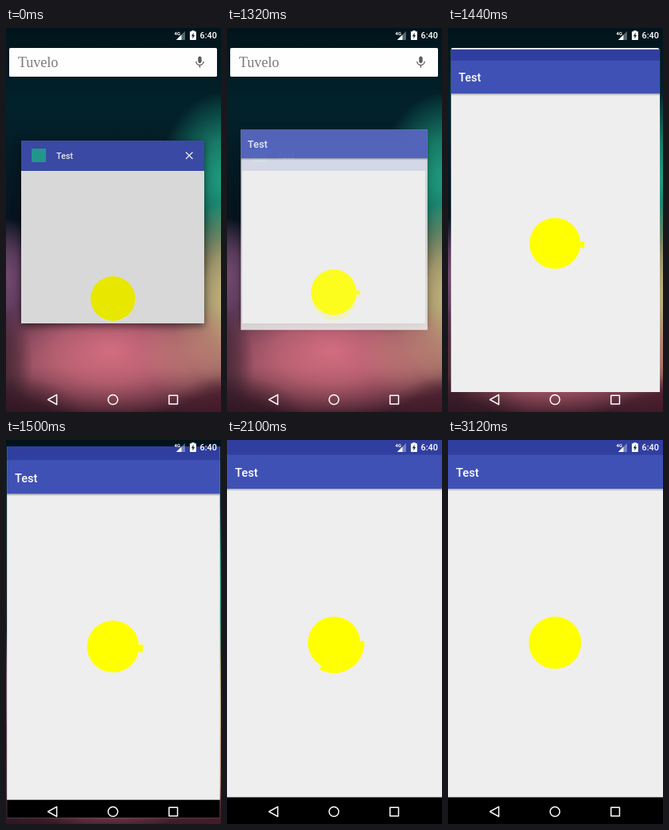
These frames come from a looping animation (269 by 481 pixels, 4110 ms). An HTML page with a canvas:

```html
<!DOCTYPE html>
<html lang="en">
<head>
<meta charset="utf-8">
<title>Opening an app from recents</title>
<style>
html, body { margin: 0; width: 100%; height: 100%; overflow: hidden; background: #000; }
canvas { display: block; }
</style>
</head>
<body>
<canvas id="stage" width="269" height="481"></canvas>
<script>
const W = 269, H = 481, LOOP = 4110, STEP = 30;
const ctx = document.getElementById('stage').getContext('2d');
const TAU = Math.PI * 2;
const SANS = 'Roboto, "Noto Sans", sans-serif';

const lerp = (a, b, k) => a + (b - a) * k;
const ramp = (t, a, b) => Math.min(1, Math.max(0, (t - a) / (b - a)));

// Cubic bezier (.4, 0, .2, 1), solved for x by bisection
function fastOutSlowIn(x) {
  let lo = 0, hi = 1;
  for (let i = 0; i < 24; i++) {
    const s = (lo + hi) / 2, r = 1 - s;
    if (1.2 * r * r * s + 0.6 * r * s * s + s * s * s < x) lo = s; else hi = s;
  }
  return lo * lo * (3 - 2 * lo);
}

function rect(c, color, x, y, w, h) {
  c.fillStyle = color;
  c.fillRect(x, y, w, h);
}

function disc(color, x, y, r) {
  ctx.fillStyle = color;
  ctx.beginPath();
  ctx.arc(x, y, r, 0, TAU);
  ctx.fill();
}

function label(str, x, y, font, color) {
  ctx.font = font;
  ctx.fillStyle = color;
  ctx.fillText(str, x, y);
}

function poly(points, close) {
  ctx.beginPath();
  points.forEach(([x, y]) => ctx.lineTo(x, y));
  if (close) ctx.closePath();
}

function blob(c, x, y, rx, ry, rgb, alpha) {
  c.save();
  c.translate(x, y);
  c.scale(rx, ry);
  const g = c.createRadialGradient(0, 0, 0, 0, 0, 1);
  g.addColorStop(0, `rgba(${rgb},${alpha})`);
  g.addColorStop(0.45, `rgba(${rgb},${alpha * 0.7})`);
  g.addColorStop(1, `rgba(${rgb},0)`);
  c.fillStyle = g;
  c.fillRect(-1, -1, 2, 2);
  c.restore();
}

function makeWallpaper() {
  const cv = document.createElement('canvas');
  cv.width = W;
  cv.height = H;
  const c = cv.getContext('2d');
  const g = c.createLinearGradient(0, 0, 0, H);
  g.addColorStop(0, '#01141b');
  g.addColorStop(0.2, '#02222b');
  g.addColorStop(0.5, '#06131e');
  g.addColorStop(0.75, '#4a2b42');
  g.addColorStop(0.88, '#7c4353');
  g.addColorStop(1, '#3c1b28');
  rect(c, g, 0, 0, W, H);
  blob(c, 275, 190, 85, 110, '32,160,130', 1);
  blob(c, 0, 312, 50, 75, '122,78,118', 0.9);
  blob(c, 285, 335, 80, 120, '208,196,130', 1);
  blob(c, 130, 405, 150, 85, '216,112,130', 0.95);
  blob(c, 235, 405, 70, 60, '190,130,115', 0.7);
  blob(c, 0, 420, 34, 70, '40,24,36', 0.6);
  blob(c, 0, 485, 100, 50, '40,20,30', 0.6);
  blob(c, 275, 480, 70, 45, '70,25,40', 0.7);
  return cv;
}
const wallpaper = makeWallpaper();

function drawSearch() {
  ctx.save();
  ctx.shadowColor = 'rgba(0,0,0,.5)';
  ctx.shadowBlur = 2;
  ctx.shadowOffsetY = 1;
  ctx.fillStyle = '#fefefe';
  ctx.beginPath();
  ctx.roundRect(4, 25, 260, 36, 1.5);
  ctx.fill();
  ctx.restore();
  label('Tuvelo', 15, 48.5, '18px "Liberation Serif", "Noto Serif", serif', '#7a7a7a');

  ctx.fillStyle = '#5c5c5c';
  ctx.beginPath();
  ctx.roundRect(240.3, 35.5, 4.4, 8.5, 2.2);
  ctx.fill();
  ctx.strokeStyle = '#5c5c5c';
  ctx.lineWidth = 1.3;
  ctx.beginPath();
  ctx.arc(242.5, 41.7, 4.7, 0, Math.PI);
  ctx.moveTo(242.5, 46.4);
  ctx.lineTo(242.5, 49.8);
  ctx.stroke();
}

function drawCard(t) {
  const lit = ramp(t, 945, 1140);
  ctx.save();
  ctx.shadowColor = 'rgba(0,0,0,.55)';
  ctx.shadowBlur = 9;
  ctx.shadowOffsetY = 3;
  rect(ctx, '#eee', 19, 141, 229, 229);
  ctx.restore();
  rect(ctx, '#3f51b5', 19, 141, 229, 38);

  ctx.fillStyle = '#26a69a';
  ctx.beginPath();
  ctx.roundRect(32, 151, 18, 17, 1);
  ctx.fill();
  label('Test', 63, 164, '500 10.7px ' + SANS, '#fff');

  ctx.strokeStyle = `rgba(255,255,255,${1 - lit})`;
  ctx.lineWidth = 1.4;
  ctx.beginPath();
  ctx.moveTo(225, 155.5);
  ctx.lineTo(233.5, 164);
  ctx.moveTo(233.5, 155.5);
  ctx.lineTo(225, 164);
  ctx.stroke();

  disc('#f8f8f4', 134.2, 340.1, 28);
  disc('#ff0', 133.8, 339, 28);
  rect(ctx, `rgba(0,0,0,${0.095 * (1 - lit)})`, 19, 141, 229, 229);
}

// Degrees swept: held back while the window opens, steady afterwards
function sweepAt(t) {
  if (t < 1500) return 7.5 * ramp(t, 1260, 1500);
  if (t < 1700) return lerp(7.5, 19, ramp(t, 1500, 1700));
  if (t < 2100) return lerp(19, 115, ramp(t, 1700, 2100));
  return Math.min(360, 115 + (t - 2100) * 0.25);
}

function drawButton(t) {
  const x = 133.9, y = 254;
  if (t < 3120) {
    const rad = Math.PI / 180;
    ctx.strokeStyle = '#ff0';
    ctx.lineWidth = 6;
    ctx.beginPath();
    ctx.arc(x, y, 35, -3.8 * rad, Math.min(356.2, sweepAt(t) + 3.8) * rad);
    ctx.stroke();
  }
  disc('#ff0', x, y, 32.8);
}

function drawWindow(t) {
  const p = fastOutSlowIn(ramp(t, 1261, 1597));
  const s = lerp(0.855, 1, p);
  const top = 22 * (1 - p), bottom = lerp(290, H, p);
  ctx.save();
  ctx.globalAlpha = ramp(t, 1261, 1330);
  ctx.translate(19 * (1 - p), 122 * (1 - p));
  ctx.scale(s, s);
  ctx.beginPath();
  ctx.rect(0, top, W, bottom - top);
  ctx.clip();

  rect(ctx, '#eee', 0, 0, W, H);
  rect(ctx, '#3f51b5', 0, 17, W, 44);
  rect(ctx, '#303f9f', 0, 0, W, 18.5);
  const g = ctx.createLinearGradient(0, 61, 0, 64);
  g.addColorStop(0, 'rgba(0,0,0,.3)');
  g.addColorStop(1, 'rgba(0,0,0,0)');
  rect(ctx, g, 0, 61, W, 3);
  label('Test', 10, 46, '500 14.7px ' + SANS, '#fff');
  drawButton(t);
  rect(ctx, '#000', 0, 447.5, W, 34);
  ctx.restore();
}

function drawStatus() {
  label('4G', 210.5, 9, '700 6px ' + SANS, '#fff');
  ctx.fillStyle = 'rgba(255,255,255,.35)';
  poly([[224, 4], [224, 15], [213, 15]], true);
  ctx.fill();
  ctx.fillStyle = '#fff';
  poly([[219.5, 8.5], [219.5, 15], [213, 15]], true);
  ctx.fill();

  rect(ctx, '#fff', 232.3, 3.2, 3.4, 2);
  ctx.fillStyle = '#fff';
  ctx.beginPath();
  ctx.roundRect(230, 4.3, 8, 10.7, 0.8);
  ctx.fill();
  ctx.fillStyle = '#17202c';
  poly([[234.7, 5.8], [231.9, 10.3], [233.6, 10.3], [233.4, 13.5], [236.1, 9], [234.5, 9]], true);
  ctx.fill();
  label('6:40', 242.5, 13.3, '500 10.8px ' + SANS, '#fff');
}

function drawNav() {
  ctx.strokeStyle = '#fff';
  ctx.lineWidth = 1.5;
  ctx.lineJoin = 'round';
  poly([[52.5, 465.5], [63.5, 459.3], [63.5, 471.7]], true);
  ctx.stroke();
  ctx.beginPath();
  ctx.arc(133.8, 465.5, 6, 0, TAU);
  ctx.stroke();
  ctx.strokeRect(204, 460.3, 10.6, 10.6);
}

function draw(t) {
  ctx.drawImage(wallpaper, 0, 0);
  drawSearch();
  drawCard(t);
  if (t > 1261) drawWindow(t);
  drawStatus();
  drawNav();
}

const start = performance.now();
function tick() {
  const t = (performance.now() - start) % LOOP;
  draw(Math.floor(t / STEP) * STEP);
  requestAnimationFrame(tick);
}
tick();
</script>
</body>
</html>
```
